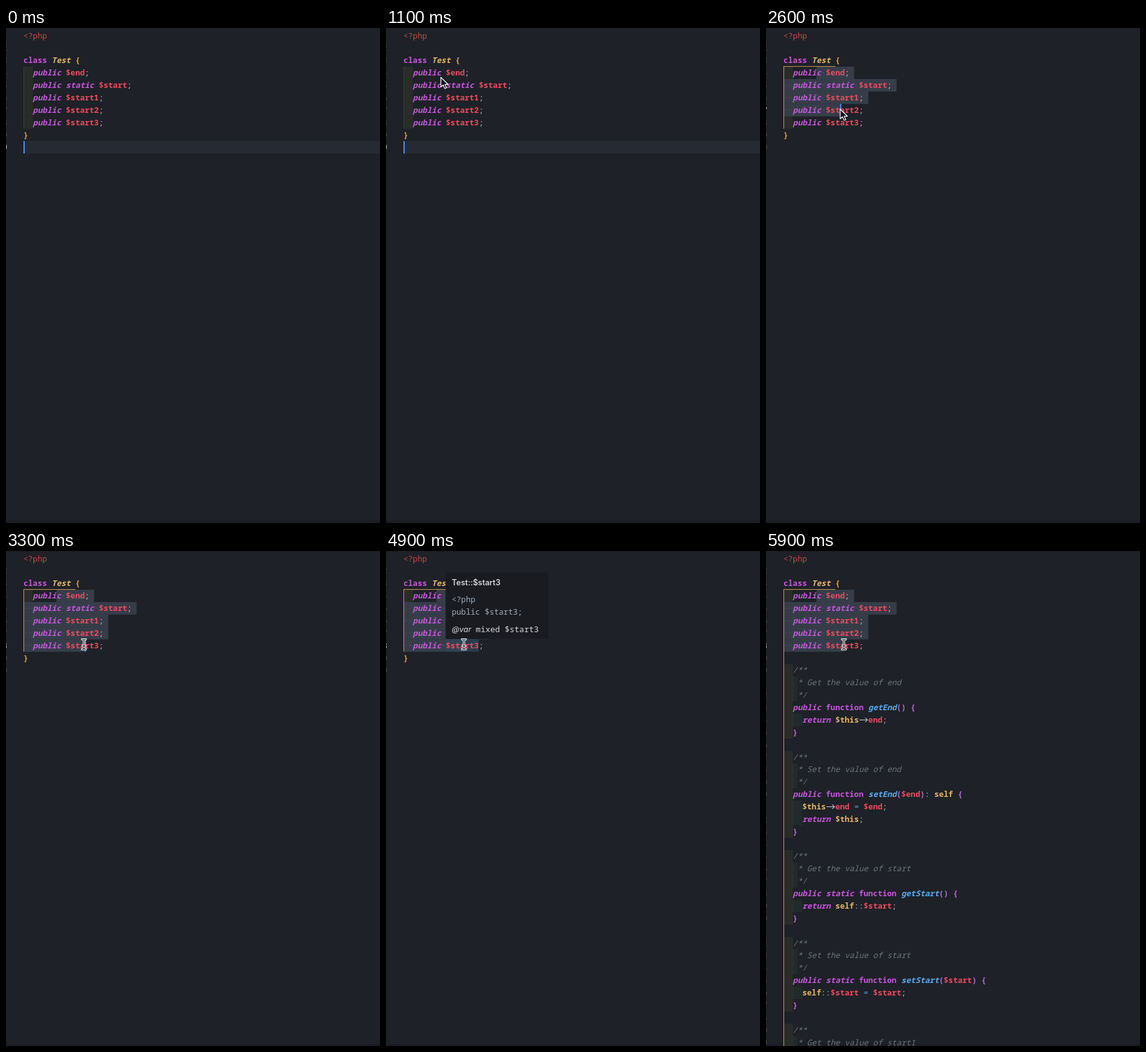
Recreate the animation shown at these times as an HTML page. Size 600 px wide and 793 px high, loop 6000 ms.

```html
<!DOCTYPE html>
<html lang="en">
<head>
<meta charset="utf-8">
<title>Code editor</title>
<style>
  html, body { margin: 0; width: 100%; height: 100%; overflow: hidden; background: #1e2127; }
  svg { display: block; width: 600px; height: 793px; }
  text { font: 12.6px "Noto Sans Mono", "DejaVu Sans Mono", monospace; white-space: pre; }
  .bold { font-weight: 600; }
  .italic { font-style: italic; }
  .ui { font-family: Inter, "Open Sans", sans-serif; font-size: 12.5px; }
</style>
</head>
<body>
<svg id="stage" viewBox="0 0 600 793"></svg>
<script>
const LOOP = 6000, STEP = 100;
const LEFT = 28, CHAR = 7.56, TOP = 2.3, ROW = 19.87;
const CLICK = 1300, DRAG = 1700, HOVER = 3600, GENERATE = 5100;
const COLOR = {
  keyword: '#c955df', type: '#e5b567', variable: '#ee4b60', plain: '#abb2bf',
  method: '#5aabf2', brace: '#b96dd5', outer: '#dda155', operator: '#3fa0d2',
  comment: '#6e737e', tag: '#c54b42', selection: '#363d49'
};

const stage = document.getElementById('stage');
const colX = col => LEFT + col * CHAR;
const rowY = line => TOP + (line - 1) * ROW;

function add(parent, tag, attrs = {}, content) {
  const node = document.createElementNS('http://www.w3.org/2000/svg', tag);
  for (const key in attrs) node.setAttribute(key, attrs[key]);
  if (content !== undefined) node.textContent = content;
  return parent.appendChild(node);
}
const group = parent => add(parent, 'g');
const box = (parent, x, y, width, height, fill) =>
  add(parent, 'rect', { x, y, width, height, fill });
const label = (parent, x, y, fill, content, cls = '') =>
  add(parent, 'text', { x, y, fill, class: cls }, content);
const show = (node, visible) => node.setAttribute('visibility', visible ? 'visible' : 'hidden');

const fields = ['$end', 'static $start', '$start1', '$start2', '$start3'];
const header = ['<?php', '', 'class Test {', ...fields.map(f => `  public ${f};`)];

function accessors(name, isStatic) {
  const title = name[0].toUpperCase() + name.slice(1);
  const scope = isStatic ? 'public static' : 'public';
  const target = isStatic ? `self::$${name}` : `$this->${name}`;
  const method = (verb, signature, body) => [
    '', '  /**', `   * ${verb} the value of ${name}`, '   */',
    `  ${scope} function ${verb.toLowerCase()}${title}${signature} {`,
    ...body.map(line => '    ' + line), '  }'
  ];
  return [
    ...method('Get', '()', [`return ${target};`]),
    ...method('Set', `($${name})${isStatic ? '' : ': self'}`,
      [`${target} = $${name};`, ...(isStatic ? [] : ['return $this;'])])
  ];
}

const shortCode = [...header, '}', ''];
const longCode = [...header, ...accessors('end'), ...accessors('start', true),
  ...accessors('start1')].slice(0, 40);

function styleOf(token, indent) {
  if (token === '<?php') return ['tag', ''];
  if (/^(public|static|return)$/.test(token)) return ['keyword', 'bold italic'];
  if (/^(class|function)$/.test(token)) return ['keyword', 'bold'];
  if (token === 'Test') return ['type', 'bold italic'];
  if (/^(\$this|self)$/.test(token)) return ['type', 'bold'];
  if (/^(get|set)/.test(token)) return ['method', 'bold italic'];
  if (/^[$\w]/.test(token)) return ['variable', 'bold'];
  if (/^[{}()]$/.test(token)) return [indent ? 'brace' : 'outer', 'bold'];
  return [token === '=' ? 'operator' : 'plain', ''];
}

function drawCode(back, front, code) {
  code.forEach((source, i) => {
    const line = i + 1, y = rowY(line), base = y + 14.3;
    const indent = source.search(/\S/);
    label(front, -5.6, base, '#474d58', String(line % 10));
    if (indent >= 2) {
      box(back, LEFT, y, 2 * CHAR, ROW + 0.2, '#2a2c29');
      if (indent > 2) {
        box(back, colX(2), y, (indent - 2) * CHAR, ROW + 0.2, '#222b2b');
        box(back, colX(2), y, 1, ROW + 0.2, '#2f3937');
      }
    }
    if (/^\s+(\/\*|\*)/.test(source)) {
      label(front, colX(indent), base, COLOR.comment, source.trim(), 'italic');
      return;
    }
    for (const { 0: token, index } of source.matchAll(/<\?php|\$?\w+|->|::|[^\s\w]/g)) {
      const x = colX(index);
      if (token === '->') {
        add(front, 'path', {
          d: `M${x + 1} ${y + 10}h13m-4 -3.5l4 3.5l-4 3.5`,
          fill: 'none', stroke: COLOR.plain, 'stroke-width': 1.2
        });
        continue;
      }
      const [color, cls] = styleOf(token, indent);
      label(front, x, base, COLOR[color], token, cls);
    }
  });
}

box(stage, 0, 0, 600, 793, '#1e2127');
box(stage, 0, 0, 600, 1, '#1a1d22');
box(stage, 0, 790, 600, 3, '#1a1c22');
const backs = [group(stage), group(stage)];
const currentRow = box(stage, LEFT, 0, 572, ROW, '#262a32');
const selection = group(stage);
const wordMark = box(stage, colX(9), rowY(8), 7 * CHAR, ROW, '#30445a');
wordMark.setAttribute('opacity', 0.75);
const guide = box(stage, LEFT, rowY(4), 1, 5 * ROW, '#3b3c35');
const guideTop = box(stage, LEFT, rowY(4) - 0.8, 11 * CHAR, 1, '#c79a58');
const fronts = [group(stage), group(stage)];
drawCode(backs[0], fronts[0], shortCode);
drawCode(backs[1], fronts[1], longCode);
const activeNumber = label(stage, -5.6, 0, '#b4bac5', '');
const caret = box(stage, 0, 0, 2, ROW, '#528bff');

const popup = group(stage);
add(popup, 'rect', { x: 96, y: 34.5, width: 164, height: 106, fill: '#191b20', stroke: '#1c1e23' });
label(popup, 105.5, 54.5, '#d3d5d9', 'Test::$start3', 'ui bold');
label(popup, 105.5, 82, '#a5abb6', '<?php');
label(popup, 105.5, 102, '#a5abb6', 'public $start3;');
label(popup, 105.5, 130, '#d3d5d9', '@var', 'ui italic');
label(popup, 144, 130, '#d3d5d9', 'mixed $start3').style.fontSize = '12.95px';

const arrow = add(stage, 'path', {
  d: 'M0 0V15.5L3.7 12.2L6.4 18L9 16.8L6.5 11.3H11.5Z',
  fill: '#111318', stroke: '#fff', 'stroke-width': 1.2, 'stroke-linejoin': 'round'
});
const beam = group(stage);
for (const [stroke, width] of [['#f2f2f2', 3.4], ['#15171b', 1.1]]) {
  add(beam, 'path', {
    d: 'M-3 -7.5Q0 -7.5 0 -5.5Q0 -7.5 3 -7.5M0 -5.5V6.5M-3 8.5Q0 8.5 0 6.5Q0 8.5 3 8.5M-2 3H2',
    fill: 'none', stroke, 'stroke-width': width, 'stroke-linecap': 'round'
  });
}

// Pointer stops: time, x, y.
const path = [
  [100, 362, 189], [300, 228, 148], [500, 228, 148], [900, 94, 84], [1100, 88, 79],
  [1300, 82, 72], [1700, 83, 73], [1800, 94, 84], [2300, 104, 106], [2400, 107, 112],
  [2600, 119, 130], [3000, 124, 147], [3200, 125, 149]
];

function pointerAt(t) {
  const next = path.findIndex(stop => stop[0] > t);
  if (next < 0) return path[path.length - 1].slice(1);
  if (next === 0) return path[0].slice(1);
  const [t0, x0, y0] = path[next - 1], [t1, x1, y1] = path[next];
  const k = (t - t0) / (t1 - t0);
  return [x0 + (x1 - x0) * k, y0 + (y1 - y0) * k];
}

function drawSelection(line, col) {
  selection.replaceChildren();
  for (let n = 4; n <= line; n++) {
    const text = header[n - 1];
    const from = n === 4 ? 7 : 0;
    const to = n === line ? col : text.length + 1;
    if (to <= from) continue;
    box(selection, colX(from), rowY(n), (to - from) * CHAR, ROW + 0.2, COLOR.selection);
    for (let c = from; c < Math.min(to, text.length); c++) {
      if (text[c] === ' ') {
        add(selection, 'circle', { cx: colX(c + 0.5), cy: rowY(n) + 10, r: 0.8, fill: '#535b68' });
      }
    }
  }
}

function render(t) {
  const [x, y] = pointerAt(t);
  const clicked = t >= CLICK, dragging = t >= DRAG, generated = t >= GENERATE;
  let line = 10, col = 0;
  if (dragging) {
    line = Math.floor((y - TOP) / ROW) + 1;
    col = Math.round((x - LEFT) / CHAR);
  } else if (clicked) {
    line = 4;
    col = 7;
  }

  [backs, fronts].forEach(pair => pair.forEach((layer, i) => show(layer, generated === (i === 1))));
  show(currentRow, !dragging);
  currentRow.setAttribute('y', rowY(line));
  drawSelection(dragging ? line : 0, col);

  guide.setAttribute('fill', clicked ? '#c79a58' : '#3b3c35');
  guide.setAttribute('height', generated ? 793 - rowY(4) : 5 * ROW);
  show(guideTop, clicked);

  activeNumber.textContent = line % 10;
  activeNumber.setAttribute('y', rowY(line) + 14.3);
  caret.setAttribute('x', colX(col));
  caret.setAttribute('y', rowY(line));
  show(caret, t < 500 || (t >= 1000 && t < 3700));

  const hovering = t >= HOVER && !generated;
  show(wordMark, hovering);
  show(popup, hovering);
  popup.setAttribute('opacity', Math.min(1, (t - HOVER + STEP) / 200));

  const place = `translate(${x} ${y})`;
  arrow.setAttribute('transform', place);
  beam.setAttribute('transform', place);
  show(arrow, t >= 100 && t < 3200);
  show(beam, t >= 3200);
}

const start = performance.now();
function tick() {
  const t = (performance.now() - start) % LOOP;
  render(Math.floor(t / STEP) * STEP);
  requestAnimationFrame(tick);
}
tick();
</script>
</body>
</html>
```
